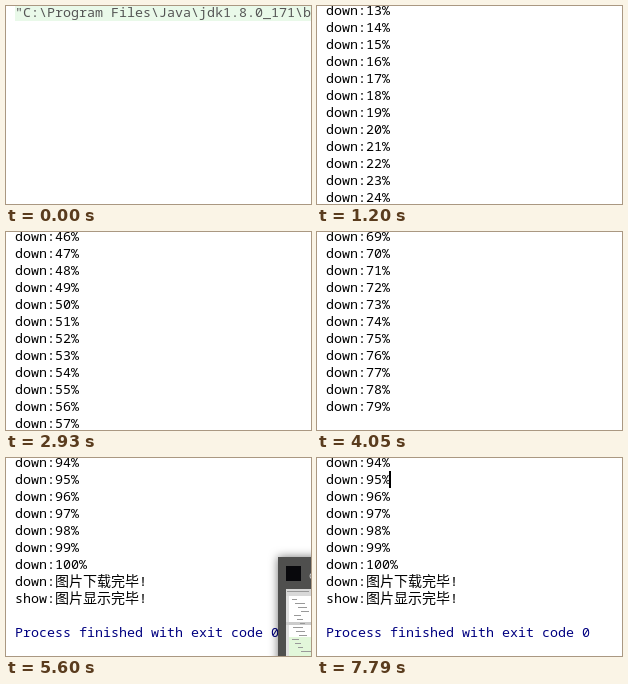
These frames come from a looping animation (305x198 px, 7.88 s). An HTML page:

```html
<!DOCTYPE html>
<html>
<head>
<meta charset="utf-8">
<style>
  html, body { margin: 0; width: 100%; height: 100%; overflow: hidden; background: #fff; }
  svg { display: block; }
  text { font: 500 13.333px "Noto Sans Mono", "DejaVu Sans Mono", monospace; white-space: pre; }
  .cmd { fill: #555; }
  .exit { fill: #000080; }
  .cjk { font-family: "Noto Sans CJK SC", "Noto Sans CJK", sans-serif; font-size: 14px; font-weight: 400; }
  .title { font: 11px "Open Sans", sans-serif; fill: #ddd; }
  .panel { filter: drop-shadow(0 0 5px rgba(0, 0, 0, .55)); }
</style>
</head>
<body>
<svg width="305" height="198" viewBox="0 0 305 198">
  <rect width="305" height="198" fill="#fff"/>
  <g id="log"></g>
  <rect id="caret" x="72" y="13" width="2" height="17"/>
  <g id="popup">
    <rect class="panel" x="272" y="99" width="60" height="130" fill="#4f4f4e"/>
    <rect x="280" y="108" width="15" height="15" fill="#08080c"/>
    <text class="title" x="303" y="121">c</text>
    <rect x="280" y="131" width="30" height="70" fill="#fff"/>
    <rect x="280" y="131" width="30" height="7" fill="#d8d8d8"/>
    <rect x="280" y="138" width="3" height="60" fill="#e0e0e0"/>
    <rect x="280" y="164" width="30" height="3" fill="#ccc"/>
    <rect x="283" y="179" width="27" height="19" fill="#e2f7da"/>
    <g id="tiny" fill="#999"></g>
  </g>
  <path id="mouse" d="M-3 -8H3M0 -7.5V7.5M-3 8H3" stroke="#000" fill="none"/>
</svg>
<script>
const $ = id => document.getElementById(id);
const LOOP = 7880, LINE = 17, ROWS = 12;

// Console lines, each a function of its baseline
const text = (body, cls = '') => y => `<text class="${cls}" x="9" y="${y}">${body}</text>`;
const note = (tag, words) => text(`${tag}:<tspan class="cjk">${words}</tspan>!`);
const command = text('"C:\\Program Files\\Java\\jdk1.8.0_171\\bin\\java.exe"', 'cmd');
const lines = [
  y => `<rect x="9" width="296" height="15" fill="#e9f9e9"/>` + command(y),
  ...Array.from({ length: 101 }, (_, i) => text(`down:${i}%`)),
  note('down', '图片下载完毕'),
  note('show', '图片显示完毕'),
  text(''),
  text('Process finished with exit code 0', 'exit')
];

// Output arrives in bursts: eleven lines every five refreshes
function lineCount(t) {
  if (t < 120) return 1;
  if (t >= 5600) return lines.length;
  const step = Math.floor((t - 60) / 112);
  return Math.min(lines.length - 2, Math.floor(4.47 + 2.2 * step));
}

function drawLog(t) {
  const count = lineCount(t);
  const blank = t >= 3410 ? 1 : 0;
  const top = Math.max(0, count + blank - ROWS);
  const base = top ? 9 : 11;
  $('log').innerHTML = lines.slice(top, count).map((line, i) => line(base + i * LINE)).join('');
}

const clamp = v => Math.max(0, Math.min(1, v));
const ramp = (t, from, to) => clamp((t - from) / (to - from));

// The pointer leaves the preview, clicks beside the text, then exits right
function drawMouse(t) {
  const a = ramp(t, 5770, 6150), b = ramp(t, 6400, 6650), c = ramp(t, 6730, 7150);
  const x = Math.round(290 - 103 * a + 5 * b + 128 * c);
  const y = Math.round(178 - 82 * a - 74 * b + 38 * c);
  $('mouse').style.display = a > 0 && c < 1 ? '' : 'none';
  $('mouse').setAttribute('transform', `translate(${x + 0.5} ${y + 0.5})`);
}

function draw(t) {
  drawLog(t);
  drawMouse(t);
  $('popup').style.opacity = ramp(t, 4310, 4590) * (1 - ramp(t, 6650, 6850));
  const caretOn = t >= 6730 && Math.floor((t - 6730) / 530) % 2 === 0;
  $('caret').style.display = caretOn ? '' : 'none';
}

// Miniature window contents inside the preview
const bar = (x, y, w) => `<rect x="${x}" y="${y}" width="${w}" height="1"/>`;
let tiny = bar(281, 133, 22);
for (let i = 0; i < 14; i++) tiny += bar(286 + i * 3 % 10, 141 + i * 4, 5 + i * 5 % 6);
$('tiny').innerHTML = tiny;

const start = performance.now();
function frame() {
  draw((performance.now() - start) % LOOP);
  requestAnimationFrame(frame);
}
frame();
</script>
</body>
</html>
```
